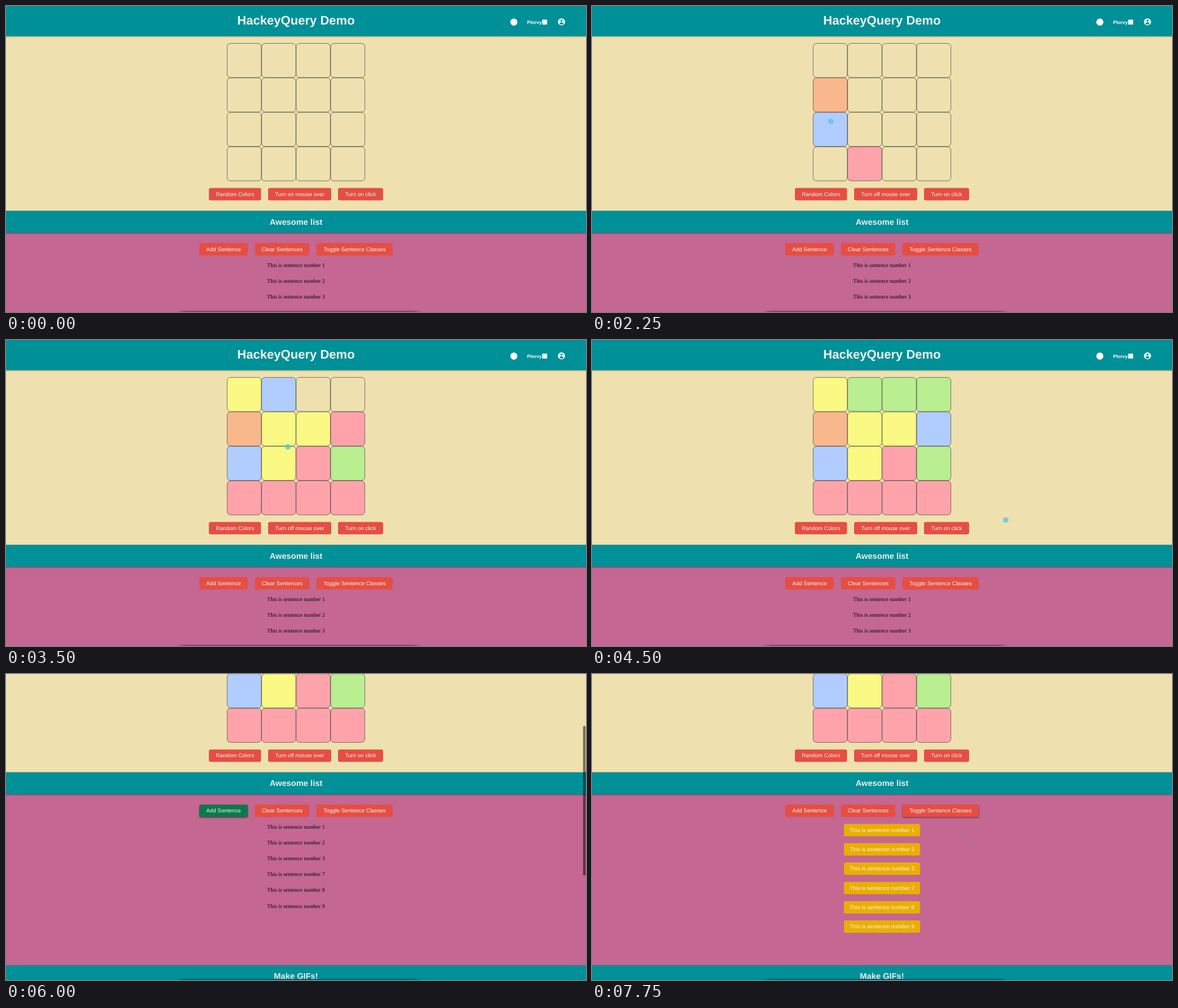
An HTML page for the animation above (8 s loop, 1029 px wide and 544 px high).

```html
<!DOCTYPE html>
<html lang="en">
<head>
<meta charset="utf-8">
<title>HackeyQuery Demo</title>
<style>
  html, body { margin: 0; width: 100%; height: 100%; overflow: hidden; background: #efe1af; }
  svg { display: block; width: 1029px; height: 544px; }
  text { font: 9.8px "Liberation Sans", Arial, sans-serif; text-anchor: middle; fill: #f6f1ee; text-rendering: geometricPrecision; }
  text.title { font-size: 22.05px; font-weight: bold; fill: #f2f2f2; }
  text.heading { font-size: 14.7px; font-weight: bold; fill: #ededed; }
  text.brand { font-size: 8.5px; font-weight: bold; fill: #fff; }
  text.plain { font-family: "Liberation Serif", Times, serif; fill: #000; }
  .band { fill: #009097; filter: drop-shadow(0 1px 1.2px rgba(0, 0, 0, .4)); }
  .cell { fill: none; stroke: #4b4a48; stroke-width: .75; }
  .button rect { fill: #e54e43; }
  .button.raised rect { filter: drop-shadow(0 1.5px 1px rgba(0, 0, 0, .55)); }
  .button.hover rect { fill: #0a7a4c; }
  .tag rect { fill: #e9af00; }
</style>
</head>
<body>
<svg id="stage" viewBox="0 0 1029 544">
  <defs>
    <filter id="blur" x="-10%" y="-300%" width="120%" height="700%"><feGaussianBlur stdDeviation="5 1.4"/></filter>
  </defs>
  <g id="page">
    <rect y="403" width="1029" height="310" fill="#c46793"/>
    <rect class="band" x="-5" y="-5" width="1039" height="58.5"/>
    <rect class="band" x="-5" y="364" width="1039" height="39.3"/>
    <rect class="band" x="-5" y="707" width="1039" height="39.3"/>
    <text class="title" x="514.5" y="33.2">HackeyQuery Demo</text>
    <text class="heading" x="514.5" y="388.6">Awesome list</text>
    <text class="heading" x="514.5" y="731.7">Make GIFs!</text>
    <g fill="#fff">
      <circle cx="901" cy="28.6" r="6.3"/>
      <text class="brand" x="937.5" y="32">Plorvy</text>
      <rect x="951.3" y="24.2" width="8.8" height="8.8" rx=".8"/>
      <circle cx="985.5" cy="28.2" r="6.2"/>
    </g>
    <g fill="#009097">
      <circle cx="985.5" cy="25.9" r="1.9"/>
      <path d="M981.8 31c0-2.6 7.4-2.6 7.4 0a4.5 4.5 0 0 1-7.4 0z"/>
    </g>
  </g>
  <rect x="310" y="543" width="420" height="4" fill="#000" opacity=".6" filter="url(#blur)"/>
  <rect id="scrollbar" x="1023.8" width="4.4" height="266" rx="2.2"/>
  <circle id="dot" r="5" fill="#50c4e6"/>
</svg>
<script>
const STEP = 250, LOOP = 8000, UNIT = 61.25;
const stage = document.getElementById('stage');
const page = document.getElementById('page');
const dot = document.getElementById('dot');
const scrollbar = document.getElementById('scrollbar');

function set(node, attrs) {
  for (const key in attrs) node.setAttribute(key, attrs[key]);
  return node;
}
function add(parent, tag, attrs, text = '') {
  const node = set(document.createElementNS(stage.namespaceURI, tag), attrs);
  node.textContent = text;
  return parent.appendChild(node);
}
function addButton(x, y, width, label, kind = 'button') {
  const group = add(page, 'g', { class: kind });
  add(group, 'rect', { x, y, width, height: 22, rx: 3 });
  add(group, 'text', { x: x + width / 2, y: y + 14.3 }, label);
  return group;
}

const cells = Array.from({ length: 16 }, (_, i) => add(page, 'rect', {
  class: 'cell', x: 392.3 + i % 4 * UNIT, y: 66.5 + Math.floor(i / 4) * UNIT,
  width: UNIT - .6, height: UNIT - .6, rx: 6
}));
addButton(360, 323.5, 92.5, 'Random Colors');
const mouseButton = addButton(465, 323.5, 112, 'Turn on mouse over');
addButton(589, 323.5, 80, 'Turn on click');
const addSentence = addButton(343, 421.5, 86, 'Add Sentence');
addButton(441.7, 421.5, 96.5, 'Clear Sentences');
const toggle = addButton(550.7, 421.5, 135.5, 'Toggle Sentence Classes');

const sentences = [1, 2, 3, 7, 8, 9].map((number, i) => {
  const label = 'This is sentence number ' + number;
  return {
    plain: add(page, 'text', { class: 'plain', x: 514.5, y: 464 + i * 28.2 }, label),
    tag: addButton(447, 455.8 + i * 34.3, 135, label, 'tag')
  };
});

const COLORS = { y: '#f9f984', b: '#b1cdff', o: '#f9b78c', p: '#ffa3ab', g: '#b9ee91' };
// step: cells painted by the pointer during that step
const PAINT = {
  8: '13p', 9: '8b 4o', 10: '0y 1b 5o', 11: '6y 7p', 12: '11g 15p',
  13: '14p 12p', 14: '9y 10p 5y', 15: '1g 2g 3g', 16: '7b'
};
// step: pointer position, held until the next entry
const POINTER = {
  1: [635, 21], 2: [590, 110], 3: [480, 190], 4: [427, 280], 5: [502, 347], 6: [515, 337],
  8: [500, 285], 9: [424, 205], 10: [480, 100], 11: [610, 163], 12: [606, 275],
  13: [440, 285], 14: [500, 190], 15: [590, 95], 16: [655, 200], 17: [734, 320],
  21: [416, 250], 25: [600, 247], 29: [650, 275], 30: [680, 308]
};

function show(node, visible) {
  node.style.display = visible ? '' : 'none';
}
function hover(button, active, raised = active) {
  button.setAttribute('class', 'button' + (active ? ' hover' : '') + (raised ? ' raised' : ''));
}

function render(step) {
  const scroll = step < 19 ? 0 : step < 20 ? 177 : 189.3;
  page.setAttribute('transform', `translate(0 ${-scroll})`);
  set(scrollbar, { y: step < 20 ? 86.3 : 92.3, opacity: step < 19 || step > 24 ? 0 : step < 24 ? .62 : .5 });

  const fills = Array(16).fill('none');
  for (const key in PAINT) {
    if (key > step) continue;
    for (const item of PAINT[key].split(' ')) fills[parseInt(item)] = COLORS[item.slice(-1)];
  }
  cells.forEach((cell, i) => { cell.style.fill = fills[i]; });

  mouseButton.lastChild.textContent = `Turn ${step < 7 ? 'on' : 'off'} mouse over`;
  hover(mouseButton, step === 6 || step === 7);
  hover(addSentence, step >= 21 && step <= 24);
  hover(toggle, step >= 25 && step <= 28, step >= 25);

  const count = 3 + Math.max(0, Math.min(3, step - 21));
  const tagged = step >= 26;
  sentences.forEach(({ plain, tag }, i) => {
    show(plain, i < count && !tagged);
    show(tag, i < count && tagged);
  });

  const last = Object.keys(POINTER).filter(key => key <= step).pop();
  const [cx, cy] = POINTER[last] || [0, 0];
  const hidden = !last || step >= 22 && step <= 24;
  set(dot, { cx, cy, opacity: hidden ? 0 : step === 31 ? .08 : .72 });
}

let shown = -1;
function tick() {
  const step = Math.floor(performance.now() % LOOP / STEP);
  if (step !== shown) render(shown = step);
  requestAnimationFrame(tick);
}
tick();
</script>
</body>
</html>
```
